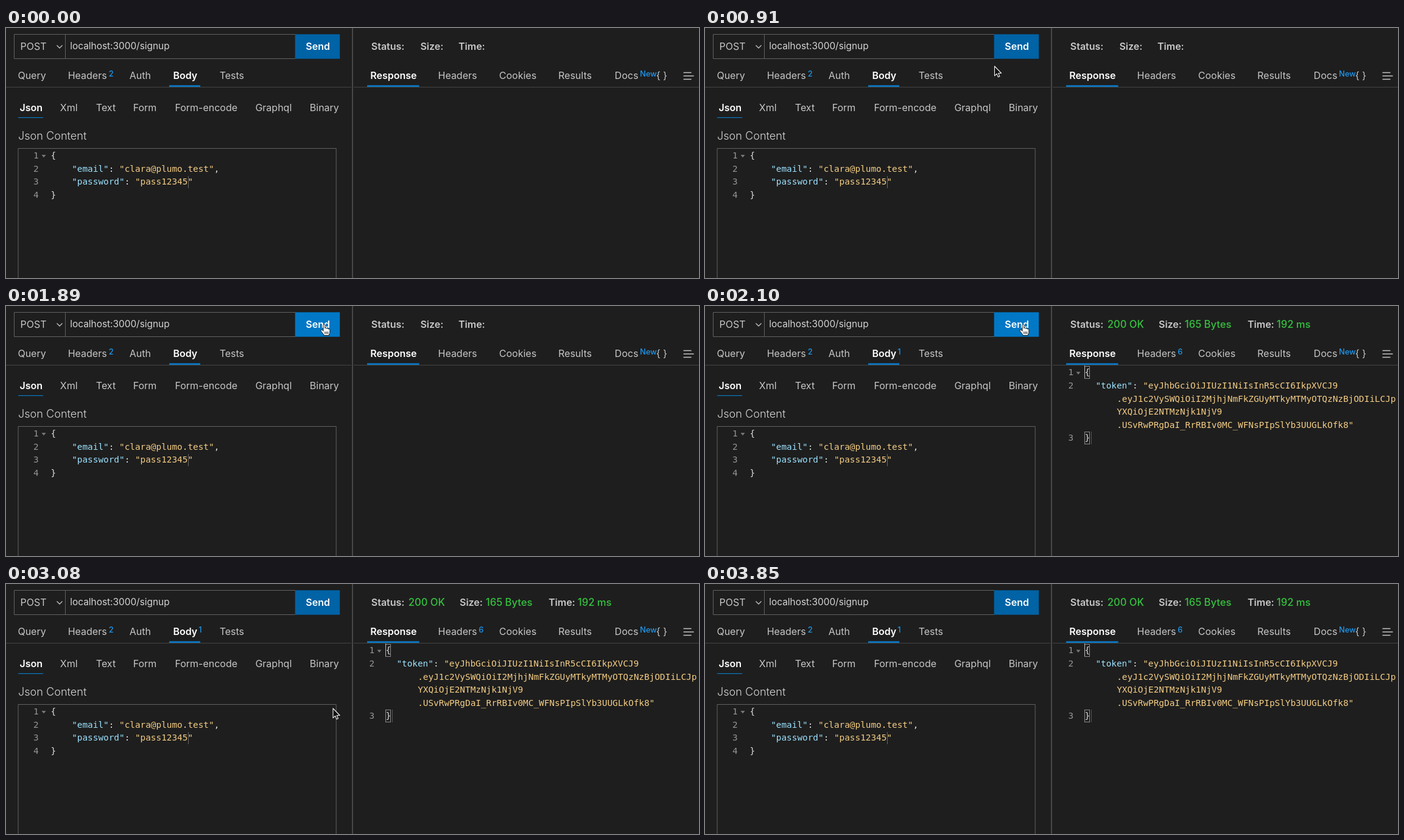
An HTML page that plays this animation: 1138 px wide and 412 px high, repeating every 3.99 s.

```html
<!DOCTYPE html>
<html lang="en">
<head>
<meta charset="utf-8">
<title>API request</title>
<style>
  html, body { margin: 0; width: 100%; height: 100%; overflow: hidden; background: #1e1e1e; }
  svg { display: block; width: 1138px; height: 412px; }
  text { white-space: pre; font: 400 16px Inter, Roboto, sans-serif; fill: #c6c6c6; }
  .on { font-weight: 600; fill: #fff; }
  .label { font-weight: 600; fill: #c8c8c8; }
  .ok { font-size: 16.6px; font-weight: 500; fill: #35c13f; }
  .badge { font-size: 12.8px; font-weight: 500; fill: #1e98ee; }
  .url { font-size: 15.4px; fill: #d4d4d4; }
  .title { font-size: 18.1px; font-weight: 300; fill: #d4d4d4; }
  .code, .num { font: 14.37px "DejaVu Sans Mono", "Noto Sans Mono", monospace; fill: #dedede; }
  .num { fill: #969696; }
  .key { fill: #9ce2ff; }
  .str { fill: #f4cd84; }
  .line { fill: none; stroke: #626262; }
  .rule { fill: #444; }
  .blue { fill: #0a78c4; }
  .icon { fill: none; stroke: #c4c4c4; stroke-width: 1.3; }
  .match { fill: none; stroke: #8a8a8a; }
</style>
</head>
<body>
<svg viewBox="0 0 1138 412" xmlns="http://www.w3.org/2000/svg">
  <rect width="1138" height="412" fill="#1e1e1e"/>
  <rect class="rule" y="97" width="567" height="1"/>
  <rect class="rule" x="571" y="97" width="567" height="1"/>
  <rect x="568" width="2" height="412" fill="#484848"/>

  <path class="line" d="M475 10.5H13.5V50.5H475M97.5 10.5V50.5"/>
  <rect id="send" x="474.7" y="10.3" width="73.5" height="40.4"/>
  <path class="icon" d="M83.5 28.5l4.5 4.5 4.5-4.5"/>
  <path class="icon" d="M1112.5 73.5h13M1112.5 79h17M1112.5 84.5h13"/>

  <rect class="blue" x="268" y="94.3" width="51" height="2.7"/>
  <rect class="blue" x="593" y="94.3" width="85.5" height="2.7"/>
  <rect class="blue" x="20" y="147" width="41" height="1.2"/>

  <path class="line" d="M20 412V198.5H542.2V412"/>
  <path d="M58.5 209h7l-3.5 4.5z" fill="#777"/>
  <rect x="299" y="244" width="1" height="20" fill="#666"/>

  <g id="base"></g>
  <g id="idle"></g>
  <g id="reply">
    <path d="M609.5 108.5h7l-3.5 4.5z" fill="#777"/>
    <rect class="match" x="623.5" y="99.5" width="8" height="20"/>
    <rect x="623" y="98" width="1" height="21" fill="#bbb"/>
    <rect class="match" x="623.5" y="207.5" width="8" height="20"/>
    <rect x="634" y="207" width="1" height="21" fill="#555"/>
  </g>

  <path id="arrow" d="M0 0V15.8L3.6 12.4 5.9 17.8 8.4 16.7 6.2 11.5H11.1Z"
    fill="#111" stroke="#f0f0f0" stroke-width="1.1" stroke-linejoin="round"/>
  <g id="hand" fill="#fff" stroke="#111" stroke-linejoin="round" stroke-linecap="round">
    <path d="M-1.5 10.5V1.3C-1.5-.6 1.4-.6 1.4 1.3V6.2C1.6 5 4.2 5 4.3 6.8 4.8 5.8 6.9 6 7 7.7
      7.7 7 9.4 7.3 9.4 9V12.5C9.4 15 8 15.6 7.8 18H-.4C-.6 15.4-3.6 13.6-5.2 10.8-6.1 9-4 8-2.8 9.3Z"/>
    <path d="M1.4 12v3.4M3.8 12v3.4M6.2 12v3.4" fill="none"/>
  </g>
</svg>
<script>
const $ = id => document.getElementById(id);
const NS = "http://www.w3.org/2000/svg";

// Each run is a [class, string] pair; runs follow one another on the line.
function put(group, x, y, ...runs) {
  const el = document.createElementNS(NS, "text");
  el.setAttribute("x", x);
  el.setAttribute("y", y);
  for (const [cls, str] of runs) {
    const span = document.createElementNS(NS, "tspan");
    span.setAttribute("class", cls);
    span.textContent = str;
    el.append(span);
  }
  $(group).append(el);
}

function row(y, active, items) {
  for (const [x, str] of items) put("base", x, y, [str === active ? "on" : "", str]);
}

function labels(group, cls, items) {
  for (const [x, str] of items) put(group, x, 36.2, [cls, str]);
}

row(36, "Send", [[23.5, "POST"], [492.3, "Send"]]);
put("base", 105.3, 34.6, ["url", "localhost:3000/signup"]);
row(84.3, "Body", [[19.4, "Query"], [101.7, "Headers"], [202.8, "Auth"], [274.4, "Body"], [350.7, "Tests"]]);
row(84.3, "Response", [[598.2, "Response"], [709.5, "Headers"], [809.8, "Cookies"],
  [907, "Results"], [999.6, "Docs"], [1067.8, "{ }"]]);
row(137.4, "Json", [[22.5, "Json"], [88.8, "Xml"], [147.8, "Text"], [208.7, "Form"],
  [277.4, "Form-encode"], [409.4, "Graphql"], [498.8, "Binary"]]);
put("base", 168.8, 80.3, ["badge", "2"]);
put("base", 1041, 80.3, ["badge", "New"]);
put("base", 20, 184, ["title", "Json Content"]);

const LEAD = 21.6;
const leftY = n => 215.1 + n * LEAD;
const rightY = n => 114.4 + n * LEAD;

for (let n = 0; n < 4; n++) put("base", 45, leftY(n), ["num", String(n + 1)]);
put("base", 73.6, leftY(0), ["code", "{"]);
put("base", 108.2, leftY(1), ["code key", '"email"'], ["code", ": "],
  ["code str", '"clara@plumo.test"'], ["code", ","]);
put("base", 108.2, leftY(2), ["code key", '"password"'], ["code", ": "], ["code str", '"pass12345"']);
put("base", 73.6, leftY(3), ["code", "}"]);

labels("idle", "label", [[599.8, "Status:"], [680.4, "Size:"], [743, "Time:"]]);

labels("reply", "label", [[599.8, "Status:"], [745, "Size:"], [891, "Time:"]]);
labels("reply", "ok", [[660.8, "200 OK"], [787.8, "165 Bytes"], [938.8, "192 ms"]]);
put("reply", 316.2, 80.3, ["badge", "1"]);
put("reply", 776.2, 80.3, ["badge", "6"]);
for (const [n, str] of [[0, "1"], [1, "2"], [5, "3"]]) put("reply", 596.5, rightY(n), ["num", str]);
put("reply", 623.4, rightY(0), ["code", "{"]);
put("reply", 641.4, rightY(1), ["code key", '"token"'], ["code", ": "],
  ["code str", '"eyJhbGciOiJIUzI1NiIsInR5cCI6IkpXVCJ9']);
[".eyJ1c2VySWQiOiI2MjhjNmFkZGUyMTkyMTMyOTQzNzBjODIiLCJp",
  "YXQiOjE2NTMzNjk1NjV9",
  '.USvRwPRgDaI_RrRBIv0MC_WFNsPIpSlYb3UUGLkOfk8"'
].forEach((str, i) => put("reply", 676.2, rightY(i + 2), ["code str", str]));
put("reply", 623.4, rightY(5), ["code", "}"]);

const LOOP = 3990, STEP = 70;
const HOVER = 1610, REPLY = 2100, LEAVE = 2870, GONE = 3290;

// Pointer tip: [ms, x, y]
const path = [
  [560, 431, 320], [630, 441, 254], [700, 450, 192], [770, 459, 140], [840, 467, 98],
  [910, 475.5, 63], [980, 485, 42], [1050, 496, 26], [1120, 506, 23], [1190, 517, 26],
  [1260, 522.5, 30.5], [2800, 523, 36], [2870, 526, 58], [2940, 529, 96],
  [3010, 533, 148], [3080, 537, 205], [3150, 541, 270], [3220, 545, 342]
];

function show(id, on) {
  $(id).setAttribute("visibility", on ? "visible" : "hidden");
}

function draw(now) {
  const t = Math.floor((now % LOOP) / STEP) * STEP;
  const spot = path.filter(p => p[0] <= t).pop();
  const seen = spot && t < GONE;
  const hover = t >= HOVER && t < LEAVE;
  show("idle", t < REPLY);
  show("reply", t >= REPLY);
  show("arrow", seen && !hover);
  show("hand", seen && hover);
  $("send").setAttribute("fill", hover ? "#0078c6" : "#0063a5");
  if (seen) {
    const at = `translate(${spot[1]} ${spot[2]})`;
    $("arrow").setAttribute("transform", at);
    $("hand").setAttribute("transform", at);
  }
}

const start = performance.now();
function tick() {
  draw(performance.now() - start);
  requestAnimationFrame(tick);
}
tick();
</script>
</body>
</html>
```
